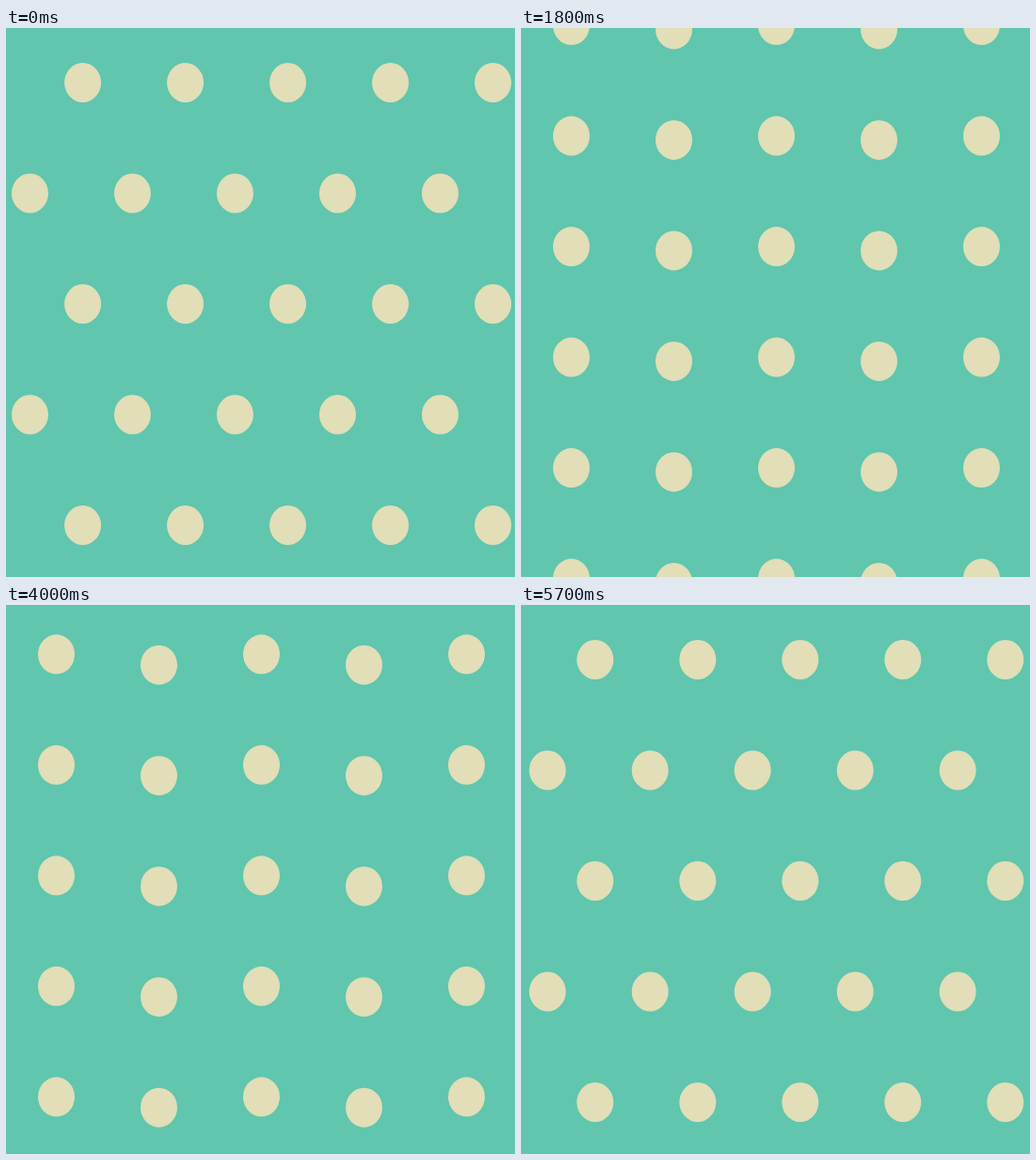
Write an HTML page with a canvas that moves like this. It is 541 px wide and 583 px high and loops after 5.8 s.

```html
<!DOCTYPE html>
<html lang="en">
<head>
<meta charset="utf-8">
<title>Sliding dots</title>
<style>
  html, body { margin: 0; width: 100%; height: 100%; overflow: hidden; background: #60c6ae; }
  canvas { display: block; }
</style>
</head>
<body>
<canvas id="stage" width="541" height="583"></canvas>
<script>
const ctx = document.getElementById('stage').getContext('2d');
const LOOP = 5800, STEP = 100;
const PITCH_X = 109, PITCH_Y = 117.5;
const LEFT = 53.5, TOP = 58;
const RX = 19.5, RY = 21;

// Rows and columns take turns; each slide covers one grid pitch at constant speed.
const turns = [-367, 1059, 2489, 3931, 5368, 6798];

function draw(time) {
  let turn = 0;
  while (time >= turns[turn + 1]) turn++;
  const progress = (time - turns[turn]) / (turns[turn + 1] - turns[turn]);
  const rowsMove = turn % 2 === 0;

  ctx.fillStyle = '#60c6ae';
  ctx.fillRect(0, 0, 541, 583);
  ctx.fillStyle = '#e1deb8';
  ctx.beginPath();
  for (let row = -2; row <= 6; row++) {
    for (let col = -2; col <= 6; col++) {
      let x = LEFT + col * PITCH_X;
      let y = TOP + row * PITCH_Y;
      // Neighbouring lines slide in opposite directions.
      if (rowsMove) x += (row % 2 ? -1 : 1) * progress * PITCH_X;
      else y += (col % 2 ? 1 : -1) * progress * PITCH_Y;
      ctx.moveTo(x + RX, y);
      ctx.ellipse(x, y, RX, RY, 0, 0, Math.PI * 2);
    }
  }
  ctx.fill();
}

const start = performance.now();
function tick() {
  const time = (performance.now() - start) % LOOP;
  draw(Math.floor(time / STEP) * STEP);
  requestAnimationFrame(tick);
}
tick();
</script>
</body>
</html>
```
